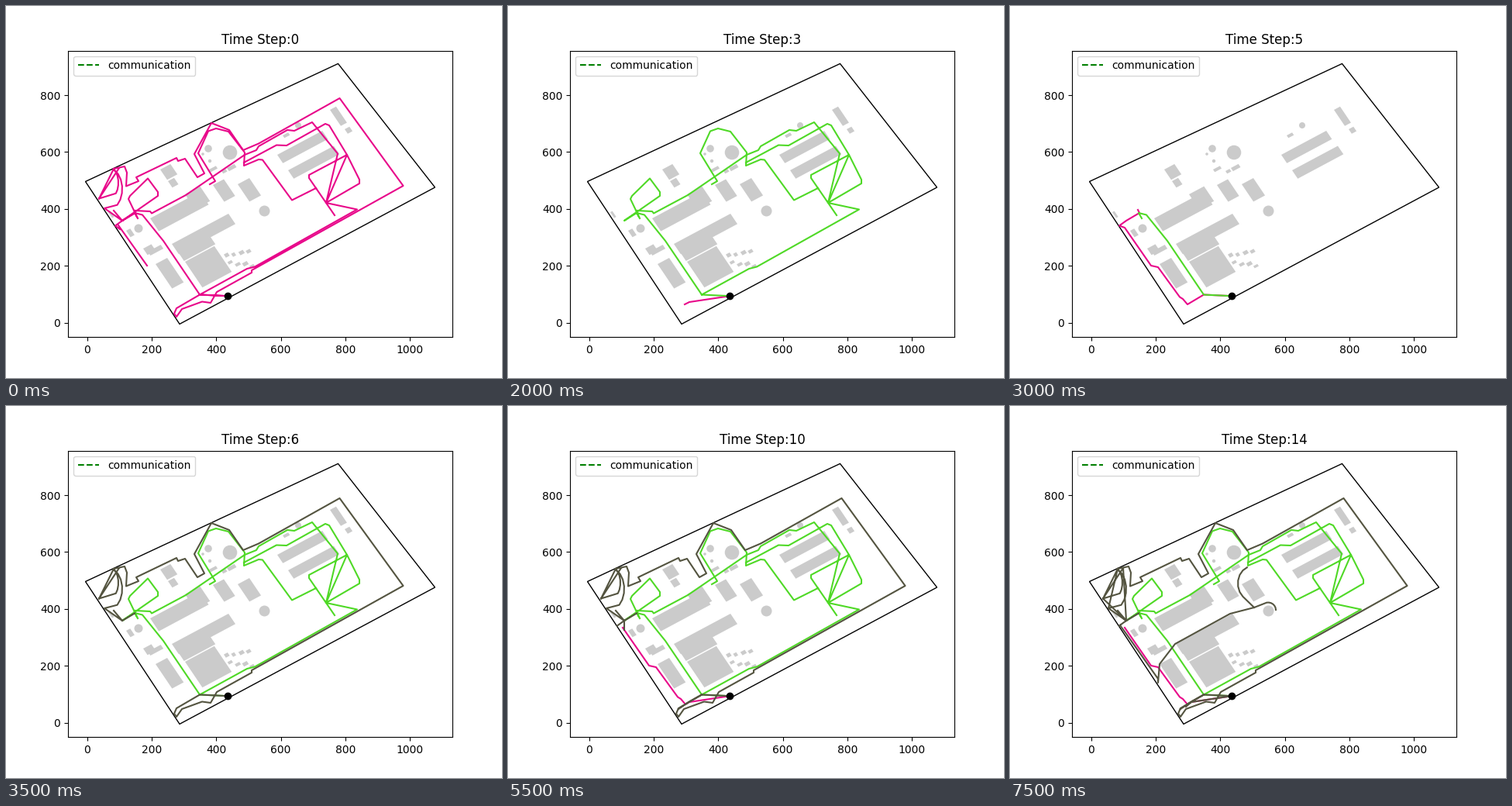
Write a matplotlib script that moves like this. It is 640 by 480 pixels and loops after 8 s.

```python
import matplotlib.pyplot as plt
from matplotlib.animation import FuncAnimation
from matplotlib.patches import Ellipse, Polygon
import numpy as np

PINK, GREEN, DARK, GREY = "#e8088a", "#4fd926", "#545440", "#cbcbcb"
LEFT, BOTTOM, WIDTH, HEIGHT = 80, 427.2, 496, 369.6
XLIM, YLIM = (-59.1, 1131.1), (-50.8, 956.8)
X_UNIT = (XLIM[1] - XLIM[0]) / WIDTH
Y_UNIT = (YLIM[1] - YLIM[0]) / HEIGHT
ALONG = np.array([0.88, -0.47])   # street directions on the stage
ACROSS = np.array([0.56, 0.83])


def to_data(points):
    """Convert stage pixels (y down) to map coordinates."""
    x, y = np.array(points, float).T
    return np.column_stack([XLIM[0] + (x - LEFT) * X_UNIT,
                            YLIM[0] + (BOTTOM - y) * Y_UNIT])


def block(x, y, length, depth):
    """Corners of a block aligned with the streets, from its left corner."""
    corner = np.array([x, y])
    a, b = length * ALONG, depth * ACROSS
    return [corner, corner + a, corner + a + b, corner + b]


def arc(x, y, rx, ry, start, stop):
    t = np.radians(np.linspace(start, stop, 7))
    return list(zip(x + rx * np.cos(t), y + ry * np.sin(t)))


def joined(routes):
    """Chain routes into one polyline with gaps."""
    rows = [np.empty((0, 2))]
    for route in routes:
        rows += [to_data(route), [[np.nan, np.nan]]]
    return np.vstack(rows).T


# Map
BORDER = [(102.5, 226.5), (428.5, 74.4), (553.5, 234), (224, 410.4)]
BLOCKS = [
    (186, 274, 73, 20), (231, 243, 22, 23),                       # halls
    (214, 307, 83, 16), (223, 319, 46, 12), (231, 330, 43, 40),
    (193, 333, 17, 38), (177, 313, 12, 10), (183, 317, 19, 6),
    (199, 211, 15, 16), (209, 226, 9, 10),
    (267, 231, 16, 26), (299, 230, 17, 27),
    (350, 192, 66, 13), (364, 212, 67, 13),
    (418, 134, 9, 25), (437, 159, 7, 7), (357, 167, 8, 4),        # sheds
    (262, 211, 10, 4), (278, 213, 6, 4), (285, 209, 11, 5),
    (155, 290, 6, 10), (132, 266, 3, 9),
]
TANKS = [(377, 154, 4), (289, 189, 9.3), (261, 184, 4.8), (333.5, 264.5, 7),
         (171, 287, 5.5), (263, 200, 2.2), (254, 191, 1.8)]

rng = np.random.default_rng(4)
for i in range(8):
    BLOCKS.append((281 + 4.7 * i, 318 + 15 * (i % 2) + rng.uniform(-3, 3),
                   rng.uniform(4, 7), rng.uniform(3, 5)))

# Routes
HOME, YARD, GATE = (286, 374.2), (250, 372.5), (150, 277)
PIER, HUB, PEAK = (139, 210), (413, 254), (440, 192)
CORNER = (120, 248.5)

GREEN_SHORT = [[HOME, YARD, (203, 303), (176, 269.5), (166, 267), (170, 274)]]
GREEN_FULL = GREEN_SHORT + [
    [YARD, (311, 339), (321, 336.5), (453, 262.5), HUB, (428, 190.5),
     (395, 150), (372, 161), (363, 160), (326, 181), (323, 186), (308, 192),
     (270, 218), (232, 244), (188, 267.5), (186, 265), (166, 264)],
    [(169, 272), (158, 249), (160, 245), (183, 222.5), (196, 240),
     (196, 245), GATE, (166, 267)],
    [(263, 230), (270, 226), (248, 190), (261, 161.5), (271, 158),
     (287, 162), (308, 189), (307, 206), (326, 198), (331, 198.5),
     (369, 250.5), (400, 235)],
    [(307, 202), (349, 179.5), (362, 180), (412, 152), (417, 154), PEAK,
     (456, 224), (456, 229), HUB, PEAK, (391, 218), (391, 222), (424, 270)],
]

PERIMETER = [
    [HOME, YARD, (220, 390), (217, 397), (220, 401), (227, 391),
     (253, 381.5), (264, 383), (272, 369), (317, 344), (317, 341),
     (512.5, 232), (430.5, 119), (326, 177.5), (306, 186), (288, 160),
     (265, 151), (243, 191), (256, 216), (247, 221), (231, 197), (222, 200),
     (220, 196), (168, 221), (171, 226), (155, 232.5), (156, 215),
     (153, 207), PIER],
    [PIER, *arc(132, 236, 18, 27, -65, 50), (127, 261), GATE, (139, 264)],
]
TOUR = PERIMETER + [
    [PIER, CORNER, (146, 209)],
    [CORNER, *arc(136, 228, 9, 18, 50, -70)],
    [GATE, (166, 267.5)],
]
EXIT = [[GATE, (141, 283.5)], [(220, 391), (233, 382), YARD]]
INNER = [
    [HOME, (234, 382), (227, 388)],
    [(142, 283), (150, 294), (191, 352), (191, 357), (193, 333), (213, 307),
     (284, 268), (315, 260), *arc(333, 263, 10, 9.5, -100, 0)],
    [(315, 260), *arc(312, 229, 18, 22, 130, 250)],
    [PIER, (127, 261)],
    [CORNER, GATE, (146, 209)],
]

WEST = [(229, 385), (223, 378), (219, 375.5), (191, 337), (182, 335),
        (148, 286)]
STUB = [[HOME, (234, 382), (228, 385)]]
WEST_SIDE = [[HOME, (234, 382), *WEST]]
WEST_LOOP = [[HOME, YARD, *WEST, (141, 283.5), GATE, (167, 267), (165, 263)]]
SPUR = [[(182, 335), (145, 283)], [GATE, (141, 283.5), (147, 288)]]

SPECIAL = {
    0: (GREEN_FULL + TOUR + SPUR, [], []),
    1: (TOUR, GREEN_FULL, []),
    2: ([], GREEN_FULL, PERIMETER),
    3: (STUB, GREEN_FULL, []),
    5: (WEST_LOOP, GREEN_SHORT, []),
}


def plan(step):
    """Pink, green and dark routes at a time step."""
    if step in SPECIAL:
        return SPECIAL[step]
    touring = step % 2 == 0 or step >= 13
    pink = [] if step < 10 and touring else WEST_SIDE
    dark = TOUR if touring else []
    if touring and step >= 10:
        dark = dark + EXIT
    if step == 10:
        dark = dark + [[GATE, (150, 289)]]
    if step >= 13:
        dark = dark + INNER
    return pink, GREEN_FULL, dark


fig, ax = plt.subplots(figsize=(6.4, 4.8), dpi=100)
ax.set(xlim=XLIM, ylim=YLIM)

for spec in BLOCKS:
    ax.add_patch(Polygon(to_data(block(*spec)), fc=GREY, lw=0))
for x, y, r in TANKS:
    ax.add_patch(Ellipse(to_data([(x, y)])[0], 2 * r * X_UNIT,
                         2 * r * Y_UNIT, fc=GREY, lw=0))
ax.add_patch(Polygon(to_data(BORDER), fill=False, ec="black", lw=1))

lines = [ax.plot([], [], color=c, lw=1.5, zorder=3 + i)[0]
         for i, c in enumerate((PINK, GREEN, DARK))]
ax.plot(*to_data([HOME]).T, "ko", ms=6, zorder=7)
ax.plot([], [], "g--", label="communication")
ax.legend(loc="upper left")
title = ax.set_title("Time Step:0")


def update(tick):
    step = max(tick - 1, 0)  # the first step is held twice as long
    for line, routes in zip(lines, plan(step)):
        line.set_data(*joined(routes))
    title.set_text(f"Time Step:{step}")
    return [*lines, title]


anim = FuncAnimation(fig, update, frames=16, interval=500, repeat=True,
                     repeat_delay=0, blit=False)
plt.show()
```
